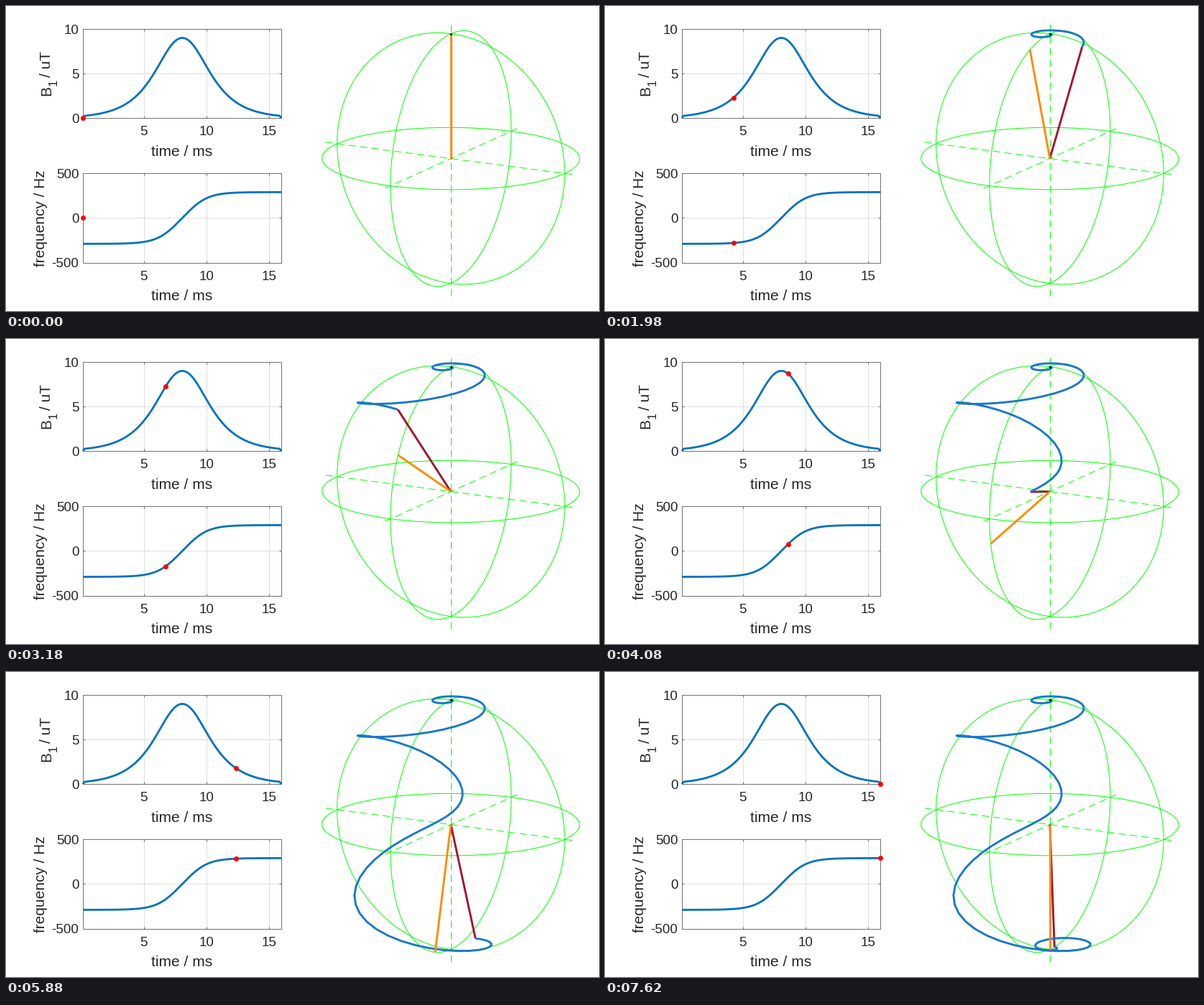
A matplotlib script for the animation above (7680 ms loop, 825 px wide and 425 px high).

```python
import numpy as np
import matplotlib.pyplot as plt
from matplotlib.animation import FuncAnimation

W, H, DPI = 825, 425, 100
PX = 72 / DPI  # points per pixel
N, DT = 128, 0.125  # samples, ms
GAMMA = 0.042577  # kHz per uT

plt.rcParams["font.family"] = "Liberation Sans"
fig = plt.figure(figsize=(W / DPI, H / DPI), dpi=DPI, facecolor="white")
ax = fig.add_axes([0, 0, 1, 1])
ax.set_xlim(0, W)
ax.set_ylim(H, 0)
ax.axis("off")

INK, FRAME, GRID = "#262626", "#505050", "#dedede"
BLUE, TRACE, CRIMSON, ORANGE = "#0072bd", "#1a78c8", "#a2142f", "#ff8c00"


def line(x, y, color, width, z, **kw):
    kw.setdefault("solid_capstyle", "butt")
    return ax.plot(x, y, color=color, lw=width * PX, zorder=z, **kw)[0]


def label(x, y, text, size=18.8, ha="center", rot=0):
    ax.text(x, y, text, fontsize=size * PX, color=INK, ha=ha, va="baseline",
            rotation=rot, rotation_mode="anchor", zorder=3)


# Hyperbolic secant pulse: amplitude in uT, frequency sweep in kHz
t = DT * np.arange(1, N + 1)
d = t - t.mean() - 0.015
u = 0.548 * d - 0.055 * np.tanh(d)
b1 = 9 / np.cosh(u)
b1[[0, -1]] = 0
freq = 0.2888 * np.tanh(u)
phase = 2 * np.pi * DT * (np.cumsum(freq) - freq[0] / 2)


def bloch():
    m = np.array([0.0, 0.0, 1.0])
    out = []
    for b, p in zip(b1, phase):
        n = np.array([np.cos(p), np.sin(p), 0])
        a = 2 * np.pi * GAMMA * b * DT
        m = (m * np.cos(a) + np.cross(m, n) * np.sin(a)
             + n * (n @ m) * (1 - np.cos(a)))
        out.append(m)
    return np.array(out)


# Orthographic view of the sphere
CENTER = np.array([618.9, 212.6])
VIEW = np.array([[-84, 38], [158.3, 20.7], [0, -174]])


def project(p):
    return CENTER + np.asarray(p) @ VIEW


mag = project(bloch())
field = np.column_stack([GAMMA * b1, 0 * t, -freq])
field = project(field / np.linalg.norm(field, axis=1)[:, None])

# Left plots
LEFT, RIGHT = 107, 383


def px_time(v):
    return LEFT + (v - t[0]) * (RIGHT - LEFT) / (t[-1] - t[0])


def plot_box(top, bottom, ticks):
    mid = (top + bottom) / 2
    line([LEFT, RIGHT], [mid, mid], GRID, 1, 1)
    for v in (5, 10, 15):
        x = px_time(v)
        line([x, x], [top, bottom], GRID, 1, 1)
        for y, s in ((top, 3), (bottom, -3)):
            line([x, x], [y, y + s], FRAME, 0.8, 2)
        label(x, bottom + 24, str(v))
    for x, s in ((LEFT, 3), (RIGHT, -3)):
        line([x, x + s], [mid, mid], FRAME, 0.8, 2)
    line([LEFT, RIGHT, RIGHT, LEFT, LEFT],
         [top, top, bottom, bottom, top], FRAME, 0.8, 2)
    for y, s in zip((top, mid, bottom), ticks):
        label(101.5, y + 6.5, s, ha="right")
    label((LEFT + RIGHT) / 2, bottom + 52.5, "time / ms", 21)


plot_box(32.3, 156.3, ("10", "5", "0"))
plot_box(233.2, 357.7, ("500", "0", "-500"))
label(62.5, 125, "B", 20.9, "left", 90)
label(70.5, 111, "1", 16.5, "left", 90)
label(62.5, 98.5, "/ uT", 20.9, "left", 90)
label(54.5, 295.2, "frequency / Hz", 20.9, "center", 90)

xs = px_time(t)
y_b1 = 156.3 - 12.43 * b1
y_freq = 295.4 - 124.7 * freq
line(xs, y_b1, BLUE, 2.8, 4)
line(xs, y_freq, BLUE, 2.8, 4)
y_dot = y_freq.copy()
y_dot[0] = 295.4

dots = ax.plot([], [], "o", color="red", ms=7 * PX, mew=0, zorder=5)[0]

# Sphere outline: three great circles and dashed axes
ang = np.linspace(0, 2 * np.pi, 241)
ring = np.column_stack([np.cos(ang), np.sin(ang), 0 * ang])
for order in ([0, 1, 2], [0, 2, 1], [2, 0, 1]):
    line(*project(ring[:, order]).T, "#00ff00", 1, 2)
for axis in np.eye(3):
    ends = project([-1.1 * axis, 1.1 * axis])
    ax.plot(*ends.T, color="#00ff00", lw=PX, zorder=2, dashes=(10, 6),
            dash_capstyle="butt")

crimson = line([], [], CRIMSON, 2.9, 6)
trace = line([], [], TRACE, 2.9, 7, solid_joinstyle="round")
orange = line([], [], ORANGE, 2.9, 8)
ax.plot(*project([0, 0, 1]), "o", color="black", ms=3 * PX, mew=0, zorder=9)


def update(i):
    dots.set_data([xs[i], xs[i]], [y_b1[i], y_dot[i]])
    crimson.set_data(*np.array([CENTER, mag[i]]).T)
    orange.set_data(*np.array([CENTER, field[i]]).T)
    trace.set_data(*mag[:i + 1].T)
    return dots, crimson, trace, orange


anim = FuncAnimation(fig, update, frames=N, interval=60, repeat=True,
                     repeat_delay=0, blit=False)
plt.show()
```
